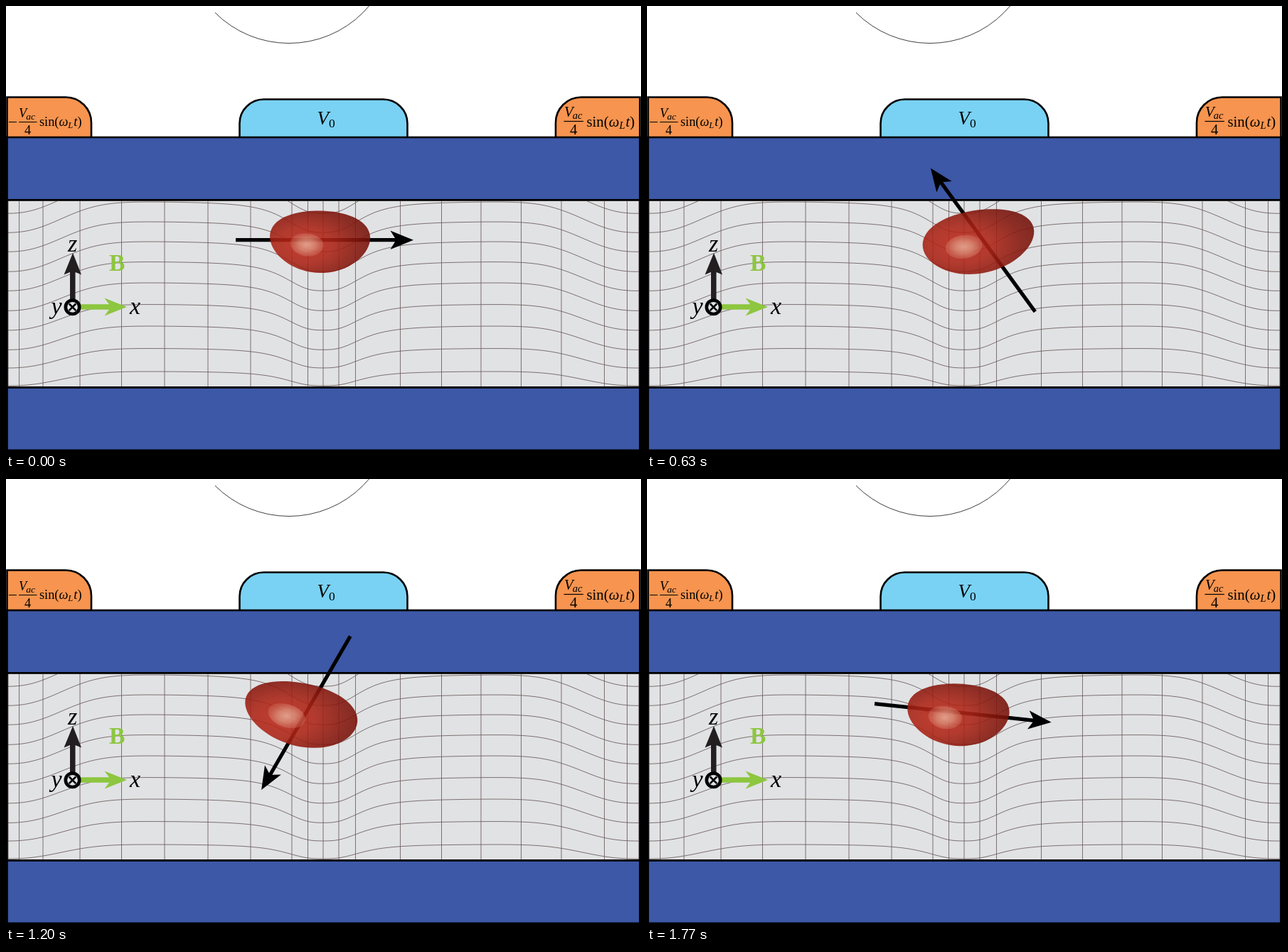
Write an HTML page that moves like this. It is 893 by 627 pixels and loops after 1.8 s.

```html
<!DOCTYPE html>
<html lang="en">
<head>
<meta charset="utf-8">
<title>Driven spin in a channel</title>
<style>
  html, body { margin: 0; width: 100%; height: 100%; overflow: hidden; background: #fff; }
  svg { display: block; width: 893px; height: 627px; }
  text { font-family: "Liberation Serif", "Times New Roman", serif; }
  .it { font-style: italic; }
  .edge { stroke: #000; stroke-width: 2.6; }
  .blue { fill: #3c58a7; }
  .orange { fill: #f7944f; }
  #grid { fill: none; stroke: #6b5b5b; stroke-width: .85; }
</style>
</head>
<body>
<svg viewBox="0 0 893 627">
  <defs>
    <clipPath id="channel"><rect x="1" y="274" width="891" height="263"/></clipPath>
    <radialGradient id="skin" cx=".34" cy=".55" r=".72">
      <stop offset="0" stop-color="#bf2718"/>
      <stop offset=".4" stop-color="#ab2315"/>
      <stop offset=".75" stop-color="#84160c"/>
      <stop offset="1" stop-color="#701007"/>
    </radialGradient>
    <radialGradient id="shine">
      <stop offset="0" stop-color="#f0d0b8" stop-opacity=".66"/>
      <stop offset=".5" stop-color="#e8b8a0" stop-opacity=".54"/>
      <stop offset="1" stop-color="#d98570" stop-opacity=".32"/>
    </radialGradient>
  </defs>

  <circle cx="398" cy="-94.5" r="147" fill="none" stroke="#000" stroke-width=".75"/>
  <rect x="270" y="-2" width="24" height="14" fill="#fff"/>

  <!-- electrodes -->
  <path class="edge orange" d="M1.5 185V128.5H84A36 36 0 0 1 120 164.5V185"/>
  <path class="edge orange" d="M891.5 185V128.5H809A36 36 0 0 0 773 164.5V185"/>
  <path class="edge" fill="#79d2f3" d="M328.5 185V165.5A34 34 0 0 1 362.5 131.5H530.5A34 34 0 0 1 564.5 165.5V185"/>

  <!-- layers -->
  <rect class="edge blue" x="1.3" y="185" width="890.4" height="88.3"/>
  <rect class="edge" x="1.3" y="273.3" width="890.4" height="264.2" fill="#e1e2e4"/>
  <rect class="edge blue" x="1.3" y="537.5" width="890.4" height="88.5"/>
  <path id="grid" clip-path="url(#channel)"/>
  <path d="M1.3 185V626M891.7 185V626M1 273.3H892M1 537.5H892" class="edge"/>

  <!-- electrode labels -->
  <g font-size="18.3">
    <path d="M4 163.5H15M18 163.5H43.5" stroke="#000" stroke-width="1.2"/>
    <text class="it" x="18" y="157">V<tspan font-size="13.5" dx="-1" dy="2.5">ac</tspan></text>
    <text x="26" y="180.5">4</text>
    <text x="47" y="169">sin(<tspan class="it">ω</tspan><tspan class="it" font-size="12.5" dy="3">L</tspan><tspan class="it" dx="1" dy="-3">t</tspan>)</text>
  </g>
  <g font-size="20.8">
    <path d="M784.5 162.5H812" stroke="#000" stroke-width="1.2"/>
    <text class="it" x="785" y="155.5">V<tspan font-size="14.5" dx="-1" dy="3">ac</tspan></text>
    <text x="793" y="180.5">4</text>
    <text x="816.5" y="169.5">sin(<tspan class="it">ω</tspan><tspan class="it" font-size="14.5" dy="3">L</tspan><tspan class="it" dx="1" dy="-3">t</tspan>)</text>
  </g>
  <text class="it" x="437.5" y="167" font-size="27">V</text>
  <text x="454" y="170.5" font-size="17.5">0</text>

  <!-- moving parts -->
  <path id="arrow" d="M-125 -2.6H99L92.5 -13.2L125 0L92.5 13.2L99 2.6H-125Z"/>
  <g opacity=".88"><path id="body" fill="url(#skin)"/></g>
  <path id="spot" fill="url(#shine)"/>

  <!-- axes -->
  <path fill="#231f20" d="M90 416V375L81.5 378.5L94 348L106 378.5L97.5 375V416Z"/>
  <path fill="#8dc63f" d="M101 420.2H145L138.5 411.5L170 424L138.5 436.5L145 427.8H101Z"/>
  <circle cx="93.5" cy="424.3" r="9.7" fill="#e1e2e4" stroke="#000" stroke-width="4.6"/>
  <path d="M88.7 419.5L98.3 429.1M98.3 419.5L88.7 429.1" stroke="#000" stroke-width="2.6"/>
  <g class="it" font-size="34">
    <text x="87" y="346">z</text>
    <text x="174" y="434">x</text>
    <text x="63.5" y="434">y</text>
  </g>
  <text x="145" y="373" font-size="33.5" font-weight="bold" fill="#8dc63f">B</text>
</svg>
<script>
  const $ = id => document.getElementById(id);

  // Field grid: straight verticals, and level lines that sag under each electrode.
  const columns = [3, 18.5, 52, 104, 162.5, 223, 284, 344, 402, 424.5, 446, 468, 491.5,
    554.5, 612.5, 668, 724.5, 781, 841.5, 873.5, 890];
  const rows = [[247.5, 45.5], [276, 44], [304, 43], [332, 43], [360.5, 41.5],
    [390, 40], [420.5, 37], [451, 34], [482.5, 28], [515, 20.5]];
  const outer = d => Math.exp(-Math.pow(Math.abs(d) / 97, 2.4));
  const inner = d => 1 / (1 + Math.pow(Math.abs(d) / 59, 2.8));
  const sag = x => outer(x) + inner(x - 446) + outer(x - 889);

  let lines = columns.map(x => `M${x} 274V537`).join('');
  for (const [y, depth] of rows) {
    for (let x = 0; x <= 893; x += 4) {
      lines += `${x ? 'L' : 'M'}${x} ${(y + depth * (sag(x) - .02)).toFixed(2)}`;
    }
  }
  $('grid').setAttribute('d', lines);

  // Ellipse in the droplet's own unit coordinates, sheared and bent to the field lines.
  function droplet(s, u0, v0, ru, rv) {
    const a = 70.5 + 10.3 * Math.abs(s);
    const b = 43.8 + 2 * s * s;
    const tilt = .175 * s - .015;
    const bend = 6.5 - 2.5 * s * s;
    let d = '';
    for (let i = 0; i < 72; i++) {
      const q = i * Math.PI / 36;
      const u = u0 + ru * Math.cos(q), v = v0 + rv * Math.sin(q);
      const x = 441.6 + 32 * s + a * u;
      const y = 332.3 + b * v - tilt * a * u - bend * u * u;
      d += `${i ? 'L' : 'M'}${x.toFixed(2)} ${y.toFixed(2)}`;
    }
    return d + 'Z';
  }

  const STEP = 30, STEPS = 60;
  function draw(now) {
    const k = Math.floor(now / STEP) % STEPS;
    const phase = 2 * Math.PI * k / STEPS;
    const s = Math.sin(phase) + .05 * Math.sin(2 * phase);  // slightly skewed swing
    $('arrow').setAttribute('transform',
      `translate(${448 + 32 * s} 329.7) rotate(${-360 * k / STEPS})`);
    $('body').setAttribute('d', droplet(s, 0, 0, 1, 1));
    $('spot').setAttribute('d', droplet(s, -.26, .11, .33, .37));
  }

  let start;
  function tick(now) {
    start ??= now;
    draw(now - start);
    requestAnimationFrame(tick);
  }
  draw(0);
  requestAnimationFrame(tick);
</script>
</body>
</html>
```
